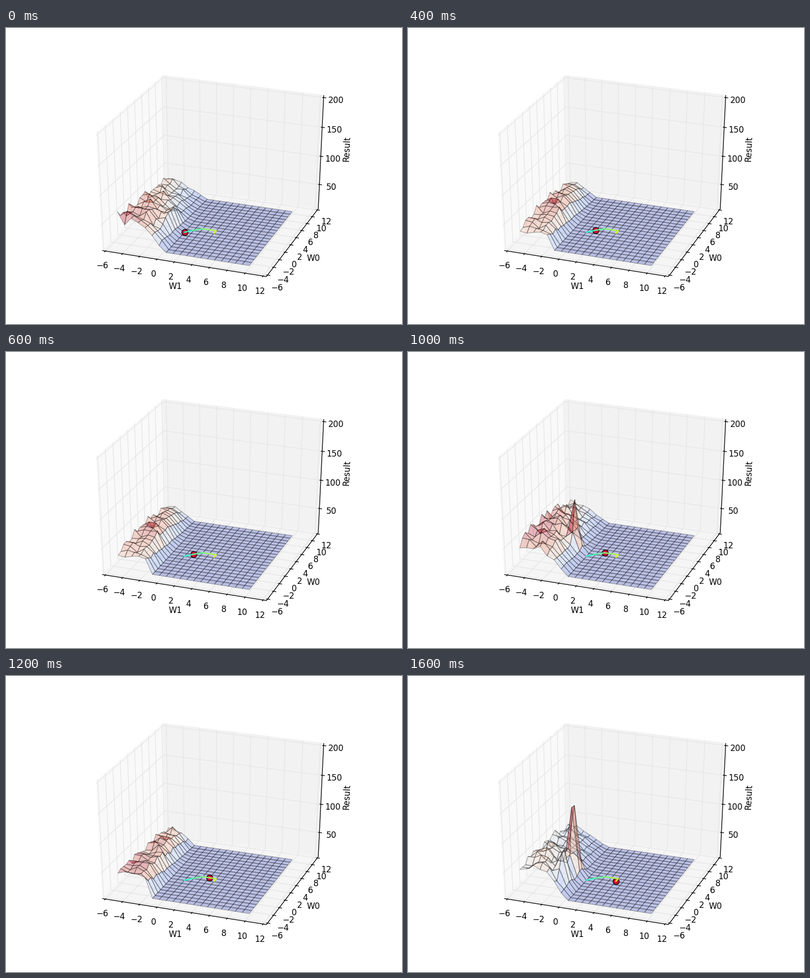
Recreate the animation shown at these times as a matplotlib script. Size 800 px wide and 600 px high, loop 1800 ms.

```python
import numpy as np
import matplotlib.pyplot as plt
from matplotlib.animation import FuncAnimation
from matplotlib.collections import PolyCollection

W, H = 800, 600
AZIM, ELEV, DIST = np.radians(-70), np.radians(30), 10
LOW = np.array([-6.0, -6.0, 10.0])
SPAN = np.array([18.0, 18.0, 190.0])
EDGE = 25 / 48          # half side of the padded unit cube
N = 20                  # surface nodes per side
MINUS = "\u2212"

plt.rcParams["font.family"] = "DejaVu Sans"
fig = plt.figure(figsize=(8, 6), dpi=100, facecolor="white")
ax = fig.add_axes([0, 0, 1, 1])
ax.set_xlim(0, W)
ax.set_ylim(H, 0)
ax.axis("off")


def project(u):
    """Perspective view of centred unit-cube points: pixel xy and depth."""
    u = np.asarray(u, float)
    ca, sa, ce, se = np.cos(AZIM), np.sin(AZIM), np.cos(ELEV), np.sin(ELEV)
    right = u @ np.array([-sa, ca, 0])
    up = u @ np.array([-ca * se, -sa * se, ce])
    depth = DIST - u @ np.array([ca * ce, sa * ce, se])
    px = 100 + (right / depth + 0.095) / 0.185 * 620
    py = 540 - (up / depth + 0.095) / 0.185 * 480
    return np.stack([px, py], axis=-1), depth


def unit(value, axis):
    return (value - LOW[axis]) / SPAN[axis] - 0.5


def line(points, color, z=1):
    xy, _ = project(points)
    ax.plot(xy[:, 0], xy[:, 1], color=color, lw=1, zorder=z,
            solid_capstyle="butt")


def pane(corners, gray):
    xy, _ = project(corners)
    ax.add_patch(plt.Polygon(xy, closed=True, fc=str(gray), ec=str(gray),
                             lw=1, zorder=0))


def label(x, y, text, **style):
    style = {"va": "baseline", **style}
    ax.text(x, y, text, ha="center", fontsize=12, zorder=2, **style)


def tick_label(point, value):
    xy, _ = project(point)
    label(xy[0] + 0.4, xy[1] + 14.8, str(value).replace("-", MINUS))


def draw_box():
    e = EDGE
    pane([(-e, -e, -e), (-e, e, -e), (-e, e, e), (-e, -e, e)], 0.975)
    pane([(-e, e, -e), (e, e, -e), (e, e, e), (-e, e, e)], 0.95)
    pane([(-e, -e, -e), (e, -e, -e), (e, e, -e), (-e, e, -e)], 0.9625)

    out, inn, far = 0.2 / 12, 0.1 / 12, e + 0.7 / 12
    grid = "0.9"
    for v in range(-6, 13, 2):
        t = unit(v, 0)
        line([(t, -e, -e), (t, e, -e), (t, e, e)], grid)
        line([(e, t, -e), (-e, t, -e), (-e, t, e)], grid)
        line([(t, -e - out, -e), (t, -e + inn, -e)], "k", 2)
        line([(e + out, t, -e), (e - inn, t, -e)], "k", 2)
        tick_label((t, -far, -far), v)
        tick_label((far, t, -far), v)
    for v in range(50, 201, 50):
        t = unit(v, 2)
        line([(-e, -e, t), (-e, e, t), (e, e, t)], grid)
        line([(e + out, e, t), (e - inn, e, t)], "k", 2)
        tick_label((far, far, t), v)

    line([(-e, -e, -e), (e, -e, -e), (e, e, -e), (e, e, e)], "k", 2)
    label(342, 529, "W1")
    label(621, 472, "W0")
    label(689, 245, "Result", va="center", rotation=87.3)


def terrain(seed, rim, ramp, crest, swell=0, peaks=()):
    """Rough plateau falling to a plain at the rim, with optional peaks.

    ramp and crest are (front, back) pairs; a peak is (height, row, width).
    """
    rng = np.random.default_rng(seed)
    row, col = np.mgrid[:N, :N]
    v = row / (N - 1)
    top = crest[0] + (crest[1] - crest[0]) * v + swell * np.sin(np.pi * v)
    slope = ramp[0] + (ramp[1] - ramp[0]) * v
    h = top * np.clip((rim - v - col) / slope, 0, 1)
    h *= 1 + np.clip(rng.normal(0, 0.12, (N, N)), -0.22, 0.22)
    for height, center, width in peaks:
        h += height * np.exp(-((col - 4.9) / 0.7) ** 2
                             - ((row - center) / width) ** 2)
    return 10 + h


broad = {"rim": 7, "ramp": (3.6, 5.4)}
narrow = {"rim": 5, "ramp": (1.2, 2.6)}
first = terrain(3, crest=(48, 30), peaks=[(22, 7, 3)], **broad)
calm = terrain(5, crest=(27, 20), swell=10, **narrow)
spiked = terrain(8, crest=(47, 31), swell=7, peaks=[(76, 8, 0.9)], **broad)
ridge = terrain(12, crest=(35, 27), swell=3, **narrow)
tower = terrain(15, crest=(50, 29), swell=5,
                peaks=[(128, 7.5, 1.2), (45, 3.5, 1.3)], **broad)

SURFACES = [first, calm, calm, calm, calm, spiked, ridge,
            (ridge + tower) / 2, tower]
PATH = np.array([(360.5, 414), (378.5, 410), (397.5, 407), (411, 409),
                 (424.5, 411), (420, 416)])
STOPS = [0, 1, 1, 1, 1, 2, 3, 4, 5]

nodes = unit(np.linspace(-5, 10, N), 0)
GX, GY = np.meshgrid(nodes, nodes)
coolwarm = plt.get_cmap("coolwarm")
jet = plt.get_cmap("jet")


def quads(a):
    """Corner values of every grid cell."""
    cells = np.stack([a[:-1, :-1], a[:-1, 1:], a[1:, 1:], a[1:, :-1]], axis=2)
    return cells.reshape((-1, 4) + a.shape[2:])


draw_box()
mesh = PolyCollection([], linewidths=1, zorder=3)
ax.add_collection(mesh, autolim=False)
ball, = ax.plot([], [], "o", ms=9, mfc=(0.84, 0.06, 0.2), mec="k", mew=1,
                zorder=4)
for k, tone in enumerate(np.linspace(0.41, 0.62, len(PATH) - 1)):
    ax.plot(*PATH[k:k + 2].T, color=jet(tone), lw=1.8, zorder=5)


def update(i):
    z = SURFACES[i]
    xy, depth = project(np.stack([GX, GY, unit(z, 2)], axis=-1))
    order = np.argsort(-quads(depth).mean(axis=1))
    level = quads(z).mean(axis=1)
    level = (level - level.min()) / (level.max() - level.min())
    mesh.set_verts(quads(xy)[order])
    mesh.set_facecolor(coolwarm(level[order], alpha=0.3))
    mesh.set_edgecolor((0, 0, 0, 0.3))
    x, y = PATH[STOPS[i]]
    ball.set_data([x], [y])
    return mesh, ball


anim = FuncAnimation(fig, update, frames=len(SURFACES), interval=200,
                     repeat=True, repeat_delay=0)
plt.show()
```
